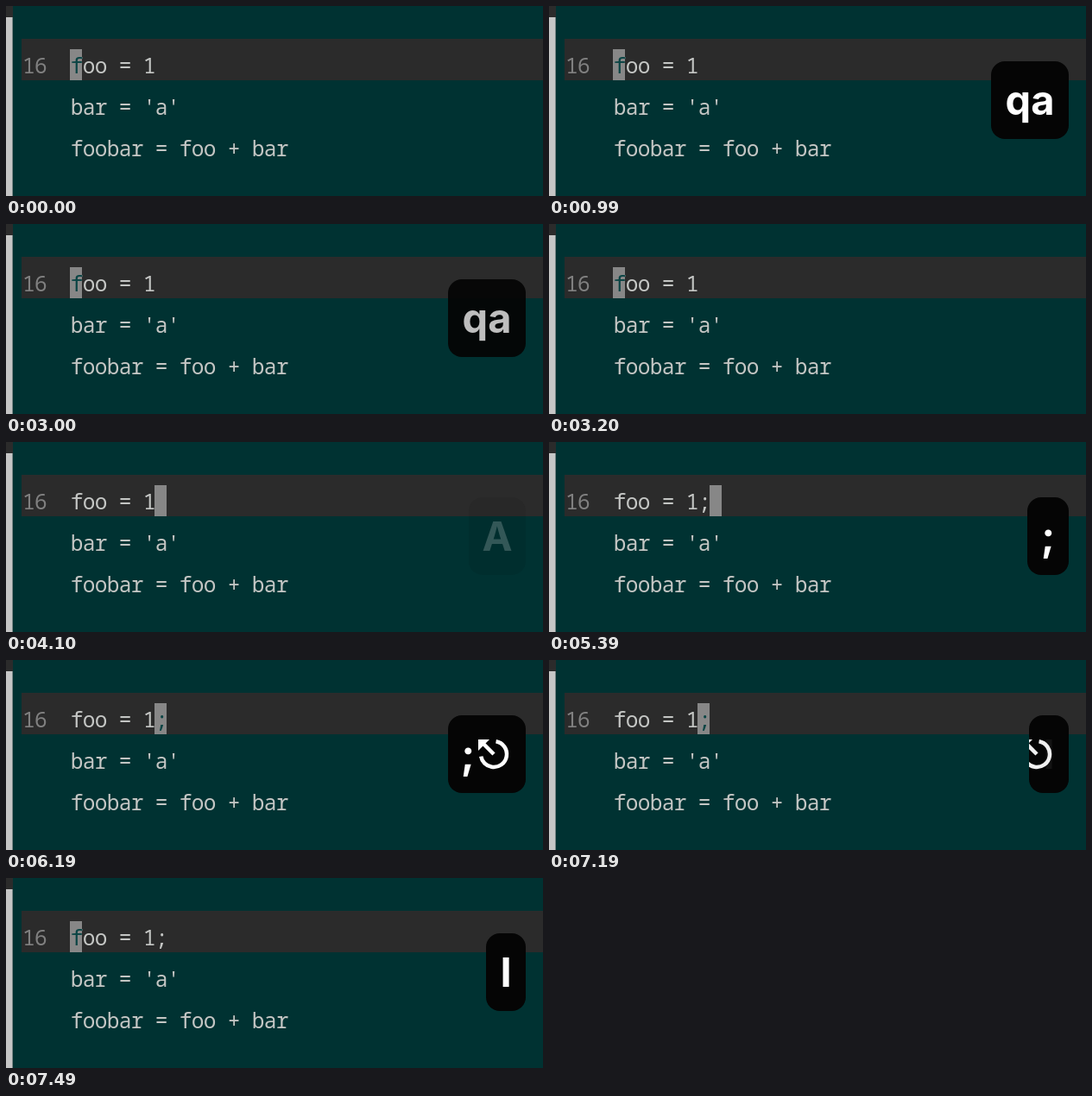
Recreate the animation shown at these times as an HTML page with a canvas. Size 622 by 220 pixels, loop 8000 ms.

```html
<!DOCTYPE html>
<html lang="en">
<head>
<meta charset="utf-8">
<title>Macro recording</title>
<style>
html, body { margin: 0; width: 622px; height: 220px; overflow: hidden; background: #033; }
canvas { display: block; }
</style>
</head>
<body>
<canvas id="stage" width="622" height="220"></canvas>
<script>
const ctx = document.getElementById('stage').getContext('2d');
const LOOP = 8000;
const CELL = 14, LEFT = 74, BASE = 78, LINE = 48;
const TEAL = '#003232', BAND = '#2b2b2b', INK = '#c4c6c4';
const CODE_FONT = '24.5px "Noto Sans Mono", "DejaVu Sans Mono", monospace';
const KEY_FONT = 'bold 47px Inter, "Liberation Sans", sans-serif';
const ESC = '\u238b';

// Badge widths; the right edge stays at x = 602.
const WIDTH = { 'qa': 90, 'A': 66, ';': 48, [';' + ESC]: 90, 'I': 46 };

// Editor states: start time, first line, cursor column.
const EDITS = [
  [0, 'foo = 1', 0],
  [4100, 'foo = 1', 7],
  [5190, 'foo = 1;', 8],
  [5990, 'foo = 1;', 7],
  [7290, 'foo = 1;', 0]
];

// Key changes: start time, key shown, opacity at each 100 ms step.
const KEYS = [
  [0, '', [0]],
  [800, 'qa', [0.2, 0.7, 1]],
  [3000, '', [0.26, 0.66, 1]],
  [4100, 'A', [0.2, 0.7, 1]],
  [5090, ';', [0.06, 0.36, 0.74, 1]],
  [5990, ';' + ESC, [0.25, 0.7, 1]],
  [7190, 'I', [0.06, 0.36, 0.74, 1]]
];

function indexAt(list, t) {
  let i = 0;
  while (i + 1 < list.length && list[i + 1][0] <= t) i++;
  return i;
}

function rect(x, y, w, h, color) {
  ctx.fillStyle = color;
  ctx.fillRect(x, y, w, h);
}

function text(str, x, y, color) {
  ctx.fillStyle = color;
  ctx.fillText(str, x, y);
}

function drawEditor(t) {
  const [, line, col] = EDITS[indexAt(EDITS, t)];
  rect(0, 0, 622, 220, TEAL);
  rect(0, 0, 8, 13, BAND);
  rect(0, 13, 7, 207, '#c6c6c6');
  rect(7, 13, 1, 207, '#7c8a8a');
  rect(18, 38, 604, 48, BAND);

  ctx.font = CODE_FONT;
  ctx.letterSpacing = '-0.7px';
  ctx.textAlign = 'left';
  text('16', 19, BASE, '#808080');
  [line, "bar = 'a'", 'foobar = foo + bar'].forEach((row, i) =>
    text(row, LEFT + 0.7, BASE + i * LINE, INK));

  const x = LEFT + col * CELL;
  rect(x, 50, CELL, 36, '#878787');
  if (line[col]) text(line[col], x + 0.7, BASE, '#0a4444');
  ctx.letterSpacing = '0px';
}

function drawEscape(cx, cy) {
  ctx.strokeStyle = ctx.fillStyle = '#fff';
  ctx.lineWidth = 4.5;
  ctx.beginPath();
  ctx.arc(cx, cy, 15, -1.4, Math.PI - 0.17);
  ctx.stroke();
  ctx.beginPath();
  ctx.moveTo(cx, cy);
  ctx.lineTo(cx - 13, cy - 13);
  ctx.stroke();
  ctx.beginPath();
  ctx.moveTo(cx - 18, cy - 17);
  ctx.lineTo(cx - 5, cy - 17);
  ctx.lineTo(cx - 18, cy - 4);
  ctx.fill();
}

function drawKey(key, alpha) {
  if (!key || alpha <= 0) return;
  const left = 602 - WIDTH[key];
  const hasEscape = key.endsWith(ESC);
  ctx.globalAlpha = alpha;
  ctx.font = KEY_FONT;
  ctx.textAlign = 'center';
  text(hasEscape ? key[0] : key, left + (hasEscape ? 23 : WIDTH[key] / 2), 126, '#fff');
  if (hasEscape) drawEscape(565, 109);
}

function drawBox(key, alpha) {
  ctx.globalAlpha = alpha;
  ctx.fillStyle = '#050505';
  ctx.beginPath();
  ctx.roundRect(602 - WIDTH[key], 64, WIDTH[key], 90, 16);
  ctx.fill();
  ctx.clip();
}

function drawBadge(t) {
  const i = indexAt(KEYS, t);
  const [start, key, steps] = KEYS[i];
  const old = i ? KEYS[i - 1][1] : '';
  if (!key && !old) return;
  const step = Math.floor((t - start + 10) / 100);
  const mix = steps[Math.min(steps.length - 1, step)];
  ctx.save();
  // The box takes its new width at once while the labels cross-fade inside it.
  if (key) drawBox(key, old ? 1 : mix < 0.5 ? mix * 0.4 : mix);
  else drawBox(old, 1 - mix * mix);
  drawKey(old, 1 - mix);
  drawKey(key, mix);
  ctx.restore();
}

function frame() {
  const t = performance.now() % LOOP;
  drawEditor(t);
  drawBadge(t);
  requestAnimationFrame(frame);
}
frame();
</script>
</body>
</html>
```
